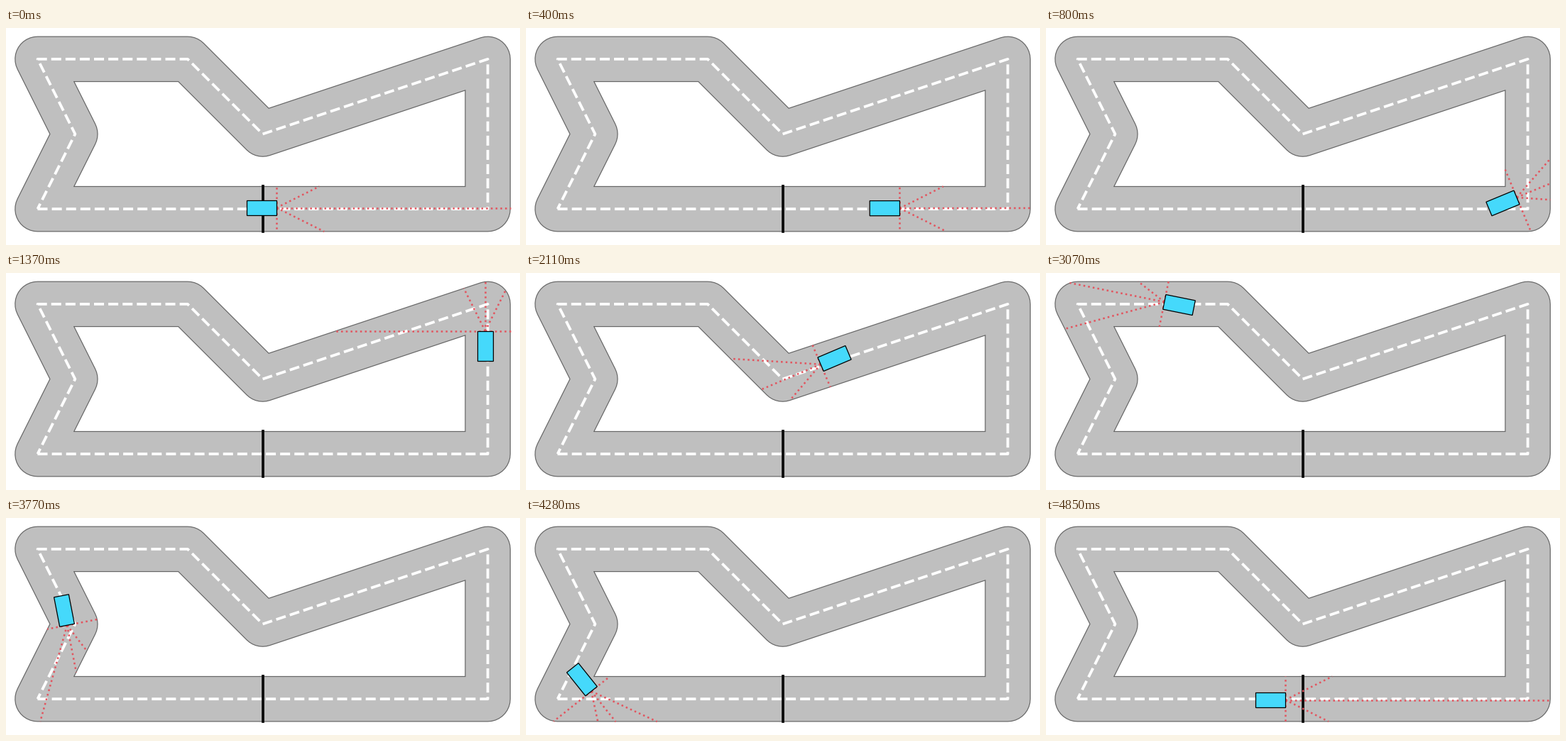
Write a matplotlib script that moves like this. It is 724x306 px and loops after 4.96 s.

```python
import numpy as np
import matplotlib.pyplot as plt
from matplotlib.animation import FuncAnimation
from matplotlib.patches import Polygon

W, H, DPI = 724, 306, 100
LOOP, STEP, TICKS = 4960, 20, 87
UNIT, X0, Y0 = 105.68, 44.5, 255.2
HALF_ROAD = 0.3 * UNIT
CAR_L, CAR_W = 0.4 * UNIT, 0.2 * UNIT
PEN = 0.91  # width of a one-point line on this stage, in points

# Road centre line, in road units
ROAD = np.array([(0, 0), (6, 0), (6, 2), (3, 1), (2, 2), (0, 2), (0.5, 1)])
ROAD = ROAD * [UNIT, -UNIT] + [X0, Y0]

# Poses around the bends: tick, x, y, heading in degrees (counter-clockwise)
POSES = np.array([
    (0, 360, 253.5, 0), (10, 590.5, 252.5, 3), (14, 643.5, 247, 22.5),
    (24, 675, 103, 90), (31, 571, 75, 198), (37, 434.5, 120.5, 203),
    (54, 187.5, 45, 168.6), (61, 72, 48, 245), (66, 82, 130.5, 281),
    (76, 90, 239, 320), (85, 316, 256.5, 360),
])
TIMES, PLACES = POSES[:, 0], POSES[:, 1:3]

# Every sixth tick or so the picture stands still
HOLDS = {int(7.85 + 6.05 * i) for i in range(14)}

RAY_ANGLES = np.arctan2([1, 0.5, 0, -0.5, -1], [0, 1, 1, 1, 0])
REACH = np.arange(0, W, 0.5)


def unit(angle):
    return np.array([np.cos(angle), -np.sin(angle)])


def velocities():
    """Heading times the mean speed of the legs before and after each pose."""
    legs = np.hypot(*np.diff(PLACES, axis=0).T) / np.diff(TIMES)
    legs = np.pad(legs, 1, mode="edge")
    speed = (legs[1:] + legs[:-1]) / 2
    return (speed * unit(np.radians(POSES[:, 3]))).T


VELOCITIES = velocities()


def pose(tick):
    """Hermite curve through the poses; the car points along it."""
    i = min(np.searchsorted(TIMES, tick, side="right") - 1, len(TIMES) - 2)
    dt = TIMES[i + 1] - TIMES[i]
    u = (tick - TIMES[i]) / dt
    p, q = PLACES[i:i + 2]
    m, n = VELOCITIES[i:i + 2] * dt
    pos = ((2 * u**3 - 3 * u**2 + 1) * p + (u**3 - 2 * u**2 + u) * m
           + (3 * u**2 - 2 * u**3) * q + (u**3 - u**2) * n)
    dx, dy = (6 * (u - u**2) * (q - p) + (3 * u**2 - 4 * u + 1) * m
              + (3 * u**2 - 2 * u) * n)
    return pos, np.arctan2(-dy, dx)


def off_centre(pts):
    """Distance of each point to the centre line."""
    d = np.roll(ROAD, -1, axis=0) - ROAD
    rel = pts[:, None] - ROAD
    u = np.clip((rel * d).sum(2) / (d * d).sum(1), 0, 1)
    return np.hypot(*np.moveaxis(rel - u[..., None] * d, 2, 0)).min(1)


def ray_end(start, angle):
    pts = start + REACH[:, None] * unit(angle)
    return pts[np.argmax(off_centre(pts) > HALF_ROAD)]


def car_corners(pos, heading):
    along, side = unit(heading) * CAR_L / 2, unit(heading + np.pi / 2) * CAR_W / 2
    return [pos + along + side, pos + along - side,
            pos - along - side, pos - along + side]


fig = plt.figure(figsize=(W / DPI, H / DPI), dpi=DPI, facecolor="white")
ax = fig.add_axes([0, 0, 1, 1])
ax.set_xlim(0, W)
ax.set_ylim(H, 0)
ax.axis("off")

# Road: a dark stroke with a slightly narrower grey one on top
for extra, color in ((1.2, "#666666"), (-1.2, "#bfbfbf")):
    ax.add_patch(Polygon(ROAD, closed=True, fill=False, edgecolor=color, zorder=1,
                         linewidth=(2 * HALF_ROAD + extra) * 72 / DPI,
                         joinstyle="round"))
ax.plot(*np.vstack([ROAD, ROAD[:1]]).T, "--", color="white", lw=3 * PEN, zorder=2)
ax.plot([X0 + 3 * UNIT] * 2, [Y0 - HALF_ROAD, Y0 + HALF_ROAD],
        color="#0c0c0c", lw=3 * PEN, zorder=3)

rays = [ax.plot([], [], ":", color="#e2555f", lw=2 * PEN, zorder=4)[0]
        for _ in RAY_ANGLES]
car = Polygon(np.zeros((4, 2)), closed=True, facecolor="#45d9fb",
              edgecolor="black", linewidth=PEN, zorder=5)
ax.add_patch(car)


def draw(frame):
    tick = min(int((frame * STEP + STEP - 1) * TICKS / LOOP), TICKS - 1)
    if tick in HOLDS:
        tick -= 1
    pos, heading = pose(tick)
    car.set_xy(car_corners(pos, heading))
    nose = pos + unit(heading) * CAR_L / 2
    for line, angle in zip(rays, RAY_ANGLES):
        line.set_data(*np.transpose([nose, ray_end(nose, heading + angle)]))
    return [car, *rays]


anim = FuncAnimation(fig, draw, frames=LOOP // STEP, interval=STEP,
                     repeat=True, repeat_delay=0, blit=False)
plt.show()
```
